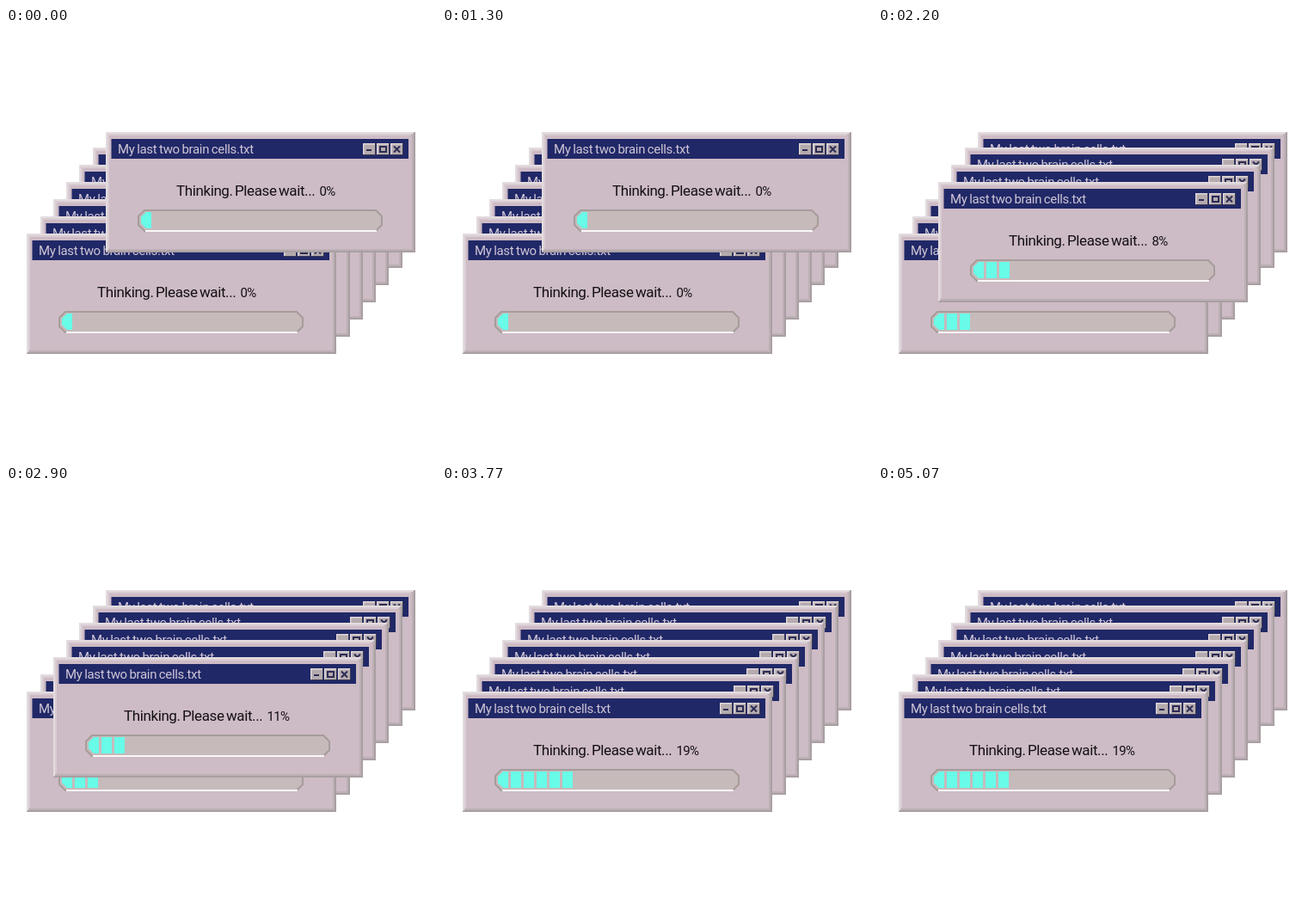
Recreate the animation shown at these times as an HTML page. Size 500 by 500 pixels, loop 5110 ms.

```html
<!DOCTYPE html>
<html lang="en">
<head>
<meta charset="utf-8">
<title>Thinking</title>
<style>
  html, body { margin: 0; height: 100%; overflow: hidden; background: #fff; }
  svg { display: block; width: 100vw; height: 100vh; }
  text { font-family: Roboto, "Open Sans", sans-serif; }
  .title { font-size: 15px; letter-spacing: -.35px; word-spacing: -.6px; fill: #cfc5d6; }
  .label { font-size: 17px; letter-spacing: -.4px; word-spacing: -1.4px; fill: #141014; }
  .percent { font-size: 15px; letter-spacing: -.7px; fill: #141014; }
</style>
</head>
<body>
<svg viewBox="0 0 500 500">
  <defs>
    <g id="button">
      <path fill="#3c3a52" d="M0 0h15v14H0z"/>
      <path fill="#ded6d9" d="M0 0h14v13H0z"/>
      <path fill="#b5abae" d="M1.5 1.5H14V13H1.5z"/>
    </g>
    <clipPath id="inside"><path d="M47 93H400V112H47L41 106V99z"/></clipPath>
    <g id="window">
      <path fill="#a99fa2" d="M0 0h360v140H0z"/>
      <path fill="#e3dcdf" d="M0 0h359L357 2H2V138L0 139z"/>
      <path fill="#bcb0b5" d="M2 2h356v136H2z"/>
      <path fill="#d9cdd3" d="M2 2h355L354 4H4V135L2 137z"/>
      <path fill="#cdbbc5" d="M4 4h352v132H4z"/>

      <path fill="#202867" d="M6.5 8h345.5v23H6.5z"/>
      <text class="title" x="14" y="25">My last two brain cells.txt</text>
      <use href="#button" x="299" y="13"/>
      <use href="#button" x="315" y="13"/>
      <use href="#button" x="331" y="13"/>
      <g fill="none" stroke="#2c2c54" stroke-width="2">
        <path d="M303 21h6"/>
        <path d="M319 17h7v6H319z"/>
        <path d="M335 16.5l7 7m0-7l-7 7"/>
      </g>

      <text class="label" x="82" y="73.5">Thinking. Please wait...</text>
      <text class="percent" x="248.5" y="73.5" id="percent">0%</text>

      <path fill="#c6babb" stroke="#a69d9b" stroke-width="2"
            d="M45 91H314L321 98V108L314 115H45L38 108V98z"/>
      <path stroke="#faf7f8" stroke-width="2" d="M46 115H315"/>
      <g id="blocks" fill="#68fbe8" clip-path="url(#inside)"></g>
    </g>
  </defs>
  <g id="stack"></g>
  <use id="active" href="#window"/>
</svg>
<script>
const SVG = 'http://www.w3.org/2000/svg';
const LOOP = 5110;
const STEPS = 7;
const LAST_WINDOW = 6;

// Start of each pass; the last pass is cut short by the loop.
const passes = [0, 670, 1300, 1945, 2575, 3225, 3870, 4500, 5170];
// Moments within a pass at which the next step shows.
const stepAt = [0, .13, .265, .4, .5, .62, .725, .842];
const blockCount = [1, 2, 2, 3, 3, 4, 4, 6];

const byId = id => document.getElementById(id);

function add(parent, tag, attributes) {
  const node = document.createElementNS(SVG, tag);
  setAll(node, attributes);
  parent.append(node);
  return node;
}

function setAll(node, attributes) {
  for (const name in attributes) node.setAttribute(name, attributes[name]);
}

const position = i => ({
  x: Math.round(116 - 15.3 * i),
  y: i ? 119 + 20 * i : 121
});

for (let i = 0; i <= LAST_WINDOW; i++) {
  add(byId('stack'), 'use', { href: '#window', ...position(i) });
}

const blocks = Array.from({ length: 6 }, (_, i) =>
  add(byId('blocks'), 'rect', { x: 41 + 15 * i, y: 93, width: 12, height: 19 }));

function stepFor(time) {
  const pass = passes.findLastIndex(start => start <= time);
  const progress = (time - passes[pass]) / (passes[pass + 1] - passes[pass]);
  return stepAt.findLastIndex(start => start <= progress);
}

let shown = -1;

function show(step) {
  shown = step;
  setAll(byId('active'), position(Math.min(step, LAST_WINDOW)));
  byId('percent').textContent = Math.round(step * 19 / STEPS) + '%';
  blocks.forEach((block, i) =>
    block.setAttribute('display', i < blockCount[step] ? 'inline' : 'none'));
}

const began = performance.now();

function tick() {
  const step = stepFor((performance.now() - began) % LOOP);
  if (step !== shown) show(step);
  requestAnimationFrame(tick);
}
tick();
</script>
</body>
</html>
```
